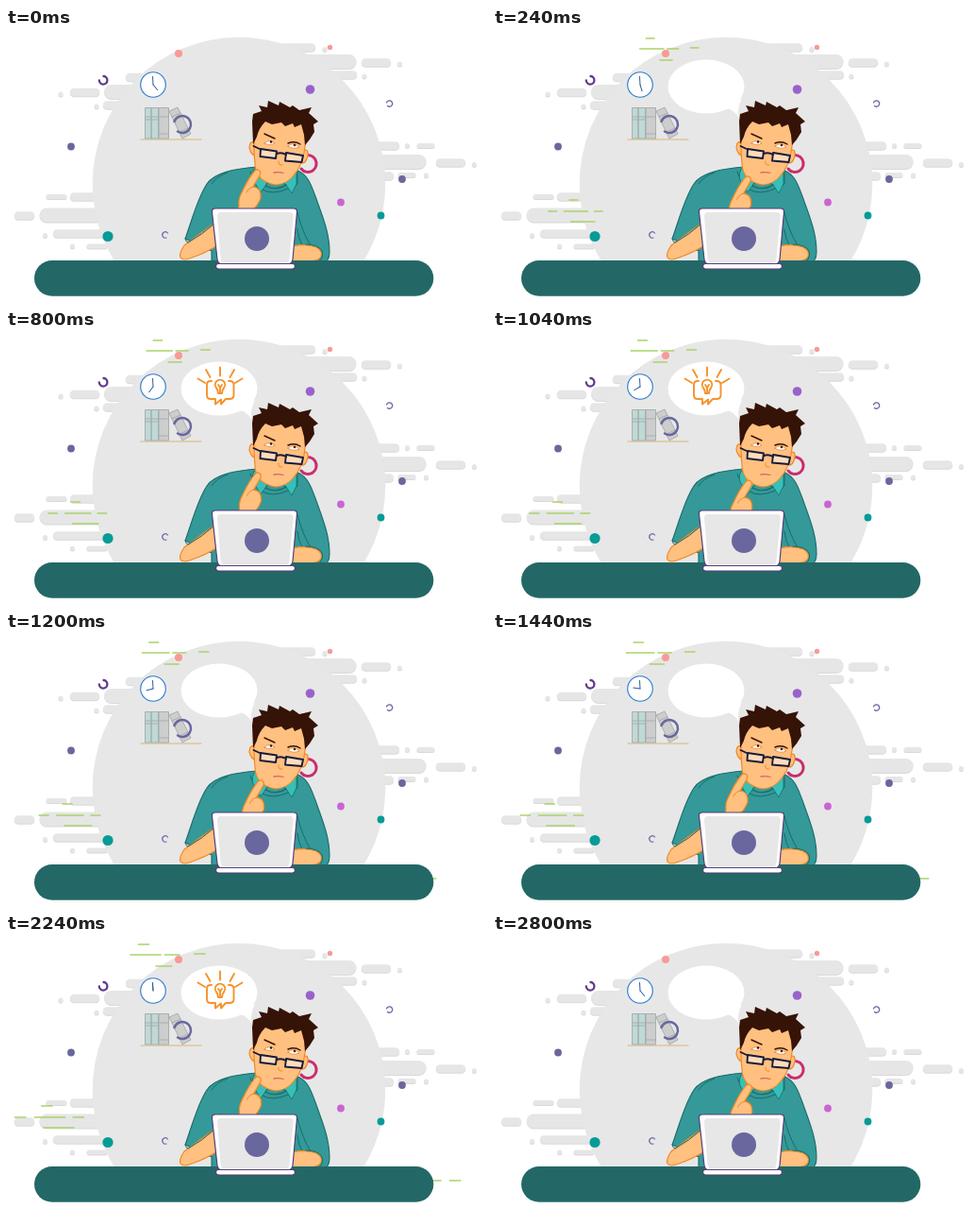
An HTML page that plays this animation: 510x290 px, repeating every 2.88 s.

```html
<!DOCTYPE html>
<html lang="en">
<head>
<meta charset="utf-8">
<title>Thinking at the desk</title>
<style>
  html, body { margin: 0; width: 100%; height: 100%; overflow: hidden; background: #fff; }
  svg { display: block; width: 100%; height: 100%; }
  .skin { fill: #ffc080; stroke: #ef8a26; stroke-width: 1.2; stroke-linejoin: round; }
  .cloth { fill: #349998; stroke: #1a6b6b; stroke-width: 1.1; stroke-linejoin: round; }
  .collar { fill: #36c0b9; stroke: #1a6b6b; stroke-width: .8; stroke-linejoin: round; }
  .line { fill: none; stroke-linecap: round; stroke-linejoin: round; }
</style>
</head>
<body>
<svg viewBox="0 0 510 290" preserveAspectRatio="none">
  <defs>
    <clipPath id="aboveDesk"><rect width="510" height="260"/></clipPath>
    <g id="clouds" class="line">
      <path stroke-width="5" d="M58 70h0M96 83h0M45 178.500h17M41.500 219.500h0M70.500 231h0M88 231h17M338 22.500h0M417.500 38h0M380 51h0M425.500 124.500h0M438 124.500h14M496.500 144.500h0M418 155.500h14M445.500 156h0"/>
      <path stroke-width="8.500" d="M72 68h23M131 52h30M107 81.500h13M72 178.500h35M13 198.500h13M54 217.500h56M290 20.500h34M381 36.500h23M344 49.500h24M385 124.500h28M460 142.500h23M385 156.500h22"/>
      <path stroke-width="15" d="M111.500 67.500h30M43 198h62M315 35.500h49M385 141.500h53"/>
    </g>
  </defs>

  <use href="#clouds" y="1" stroke="#d9d9d9"/>
  <use href="#clouds" stroke="#e6e6e6"/>
  <circle cx="247" cy="165" r="155.300" fill="#e7e7e7" clip-path="url(#aboveDesk)"/>

  <g fill="#f89a95"><circle cx="183" cy="27" r="4"/><circle cx="343.500" cy="20.500" r="2.700"/></g>
  <g fill="#069b97"><circle cx="108" cy="220.500" r="5.600"/><circle cx="397.500" cy="198.500" r="3.900"/></g>
  <g fill="#69679d"><circle cx="69" cy="125.500" r="3.900"/><circle cx="420" cy="160" r="3.900"/></g>
  <circle cx="322.500" cy="65" r="4.800" fill="#9962cb"/>
  <circle cx="355" cy="184.500" r="3.900" fill="#c965d2"/>

  <g stroke="#a3abab" stroke-width=".9">
    <path d="M142.500 118H207.500" stroke="#dfcfae" stroke-width="2"/>
    <path d="M147.500 84.500H154V117H147.500ZM154 84.500H161.500V117H154Z" fill="#bfd9d6"/>
    <path d="M162 84.500H172.500V117H162ZM173 88L182 84L196 112L187 117Z" fill="#cdcdcd"/>
    <path class="line" d="M147.500 94H161M147.500 97H161M162 94H172M162 112H172M176 94L185 90M184 110L193 106"/>
  </g>
  <g class="line">
    <path d="M178.500 99A9 9 0 1 1 182 109.500" stroke="#69679d" stroke-width="2.500"/>
    <path d="M98.800 55.300A4.300 4.300 0 1 0 103.500 51" stroke="#613a90" stroke-width="2.300"/>
    <path d="M403.500 79A3.200 3.200 0 1 1 404.500 82.500" stroke="#6a64a6" stroke-width="1.300"/>
    <path d="M171.500 217A3.200 3.200 0 1 0 170 222" stroke="#6a64a6" stroke-width="1.200"/>
    <path d="M316 135.500A9 9 0 1 1 313 149" stroke="#cc2b6d" stroke-width="3"/>
  </g>

  <g class="line" stroke="#2f5d9e" stroke-width="1">
    <circle cx="156" cy="60" r="13.300" fill="#fff" stroke="#2879cf" stroke-width="1.100"/>
    <path d="M156 60L155.500 51.500"/>
    <path id="hour" d="M156 60V52.800"/>
  </g>

  <g id="bubble">
    <path d="M247 85Q256 86 261 96Q258 86 264 74Z" fill="#fff"/>
    <ellipse cx="226" cy="62" rx="40.500" ry="28.500" fill="#fff"/>
    <g id="idea" class="line" stroke="#f7922a" stroke-width="1.900">
      <path d="M227 39.500V48.500M212 42L216.500 50M242 42L237.500 50M203.500 51.500L211 56M250.500 51.500L243 56"/>
      <path d="M218 54H217Q213 54 213 58V69Q213 73 217 73H222V78.500L228 73.500V78.500L233 73H237Q241.500 73 241.500 69V58Q241.500 54 237 54H236"/>
      <path d="M225 67Q225 63.500 222.800 61A5.200 5.200 0 1 1 231.200 61Q229 63.500 229 67ZM225 58L227 61L229 58M227 61V67"/>
    </g>
  </g>

  <g stroke="#abd36b" stroke-width="1.700" id="streaks">
    <path id="topStreaks" d="M8 11h12M0 22h32M35 22h16M65 21h12M26 34h17"/>
    <path id="leftStreaks" d="M27 182h12M0 194h12M20 194h32M59 194h12M29 205h32"/>
    <path id="rightStreaks" d="M0 261h-12M-20 261h-32"/>
  </g>

  <path class="cloth" d="M266 147C242 149 221 153 213 165C203 180 197 204 190 223L218 236V249H336Q343 247 343 237C343 216 335 198 328 178C323 165 320 153 304 149Z"/>
  <path class="line" d="M235 153Q223 157 218 165M309 195Q314 216 323 230M309 213Q310 223 314 230M259 152Q270 188 309 165V151" stroke="#1a6b6b"/>
  <path class="skin" d="M222 206Q204 219 189 230Q183 239 185 243Q188 247 197 243Q212 238 226 229V206Z"/>
  <path class="line" d="M190 223Q191 227 193 227Q208 219 221 207" stroke="#1a6b6b"/>
  <path class="skin" d="M303 231Q318 228 329 232Q336 236 334 242Q331 247 320 247H301Z"/>
  <path class="line" d="M318 229Q331 229 335 236Q337 242 332 247" stroke="#1a6b6b"/>

  <path class="collar" d="M263 149Q259 158 264 164L270 174L275 167Q286 173 297 166L303 175L308 165V150Z"/>
  <path class="cloth" d="M275 167Q286 173 297 166L294 164H277Z" stroke-width=".8"/>

  <path class="skin" d="M315 130Q321 127 320 135Q318 144 313 143Z"/>
  <path class="skin" d="M264 121Q258 119 258 127Q260 135 265 135Z"/>
  <path class="skin" d="M264 103Q262 127 264 143Q264 153 271 160Q280 166 287 166Q298 165 305 156Q313 147 316 132L320 105Q293 86 264 103Z"/>
  <path d="M262 123L261 99L262 91L271 88L268 82L277 84L278 77L289 82L290 78L301 84L304 82L311 87L324 84L321 90L331 99L326 102L327 110L322 118L317 124L316 113L313 102L306 105L304 101L296 104L292 100L282 102L275 99Q268 106 266 115Z" fill="#361307"/>
  <g class="line">
    <path d="M274 122Q279 117 285 122Q280 125 274 122ZM299 125Q305 120 311 126Q304 129 299 125Z" fill="#fff" stroke="#d97a27" stroke-width=".7"/>
    <path d="M281 120.500h0M306 124h0" stroke="#361307" stroke-width="2.600"/>
    <path d="M274 112L285 117M299 122Q306 119 312 123" stroke="#361307" stroke-width="1.400"/>
    <path d="M289 141Q288 146 293 145" stroke="#ef8a26"/>
    <path d="M284 153Q289 152 294 153.500" stroke="#d9646a" stroke-width="1.300"/>
    <g stroke="#171b3c" stroke-width="1.900">
      <path d="M270 128L287 130.500L286 138L269.500 136ZM297 132L315 135L313.500 142L296 140.500Z" fill="#fff" fill-opacity=".45"/>
      <path d="M287 133Q292 131 297 134M270 128.500L262.500 125"/>
    </g>
  </g>
  <g id="hand">
    <path class="skin" d="M268 150.500Q271 152 269 156L262 168Q271 169 270 180Q267 188 262 192V215H242L247 188Q246 181 250 174Q257 159 263 152Q266 148.500 268 150.500Z"/>
    <path class="line" d="M262 168Q257 169 255 174" stroke="#ef8a26"/>
  </g>

  <rect x="30" y="246" width="423.300" height="37.700" rx="18.800" fill="#236866"/>
  <g stroke="#543c77" stroke-width="1.200">
    <path d="M218.500 195Q218 191 222 191H305Q309 191 308.500 195L304 245Q303 250 298 250H230Q225 250 224 245Z" fill="#fff"/>
    <path d="M224 199Q224 195 228 195H301Q305 195 304.700 199L300.500 244Q300 248.500 296 248.500H232Q228 248 227.500 244Z" fill="#e7e7e7" stroke="none"/>
    <circle cx="266" cy="223" r="13" fill="#69679d" stroke="none"/>
    <rect x="222.500" y="249.500" width="84" height="5.500" rx="2.700" fill="#fff"/>
  </g>
</svg>
<script>
const LOOP = 2880, STEP = 80, RESET = 2800;
const SLIDE_END = 2400, POSE_END = 2560;
const NOD = 720, BLINK = 1200;

const byId = id => document.getElementById(id);
const show = (id, on) => byId(id).setAttribute('visibility', on ? 'visible' : 'hidden');
const place = (id, transform) => byId(id).setAttribute('transform', transform);

function draw(time) {
  const t = Math.floor(time % LOOP / STEP) * STEP;
  const moving = t > 0 && t < RESET;
  const slide = Math.min(t, SLIDE_END) / SLIDE_END;
  const pose = Math.min(t, POSE_END);

  // Each group of streaks drifts outwards while it lengthens.
  const slideGroup = (id, from, to) =>
    place(id, `translate(${from + (to - from) * slide}) scale(${0.8 + 0.26 * slide} 1)`);
  show('streaks', moving);
  slideGroup('topStreaks', 158, 129.5);
  slideGroup('leftStreaks', 64, 5);
  slideGroup('rightStreaks', 426, 486.5);

  place('hour', `rotate(${140 + (moving ? pose * 0.096 : 0)} 156 60)`);

  const dip = (1 - Math.cos(pose / NOD * 2 * Math.PI)) / 2;
  place('hand', `translate(${dip * 4.8} ${dip * 9.5})`);

  show('bubble', t > 0);
  show('idea', t < SLIDE_END && t % BLINK >= BLINK / 3);
}

const start = performance.now();
function tick() {
  draw(performance.now() - start);
  requestAnimationFrame(tick);
}
tick();
</script>
</body>
</html>
```
